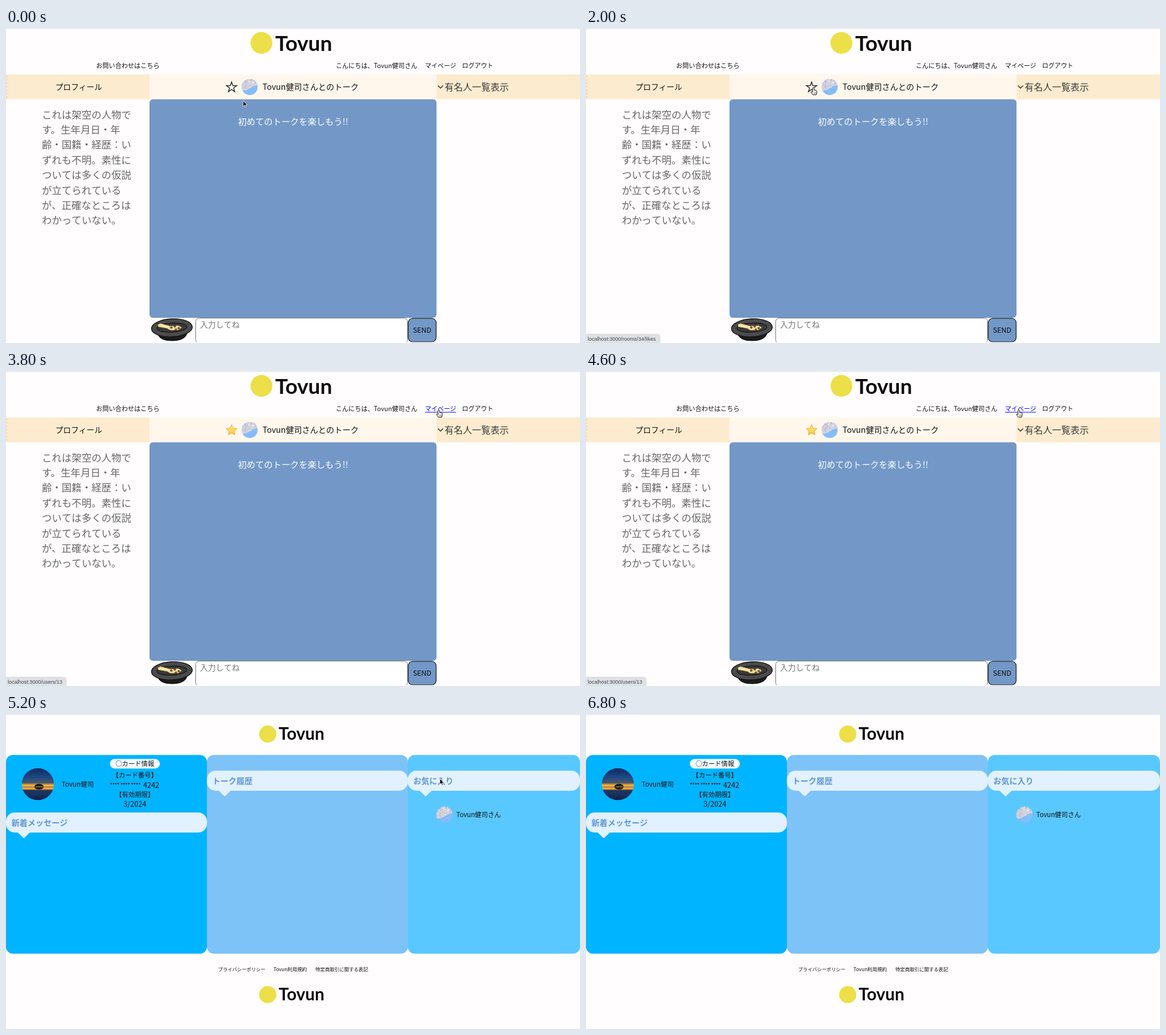
Animation of 1000 by 550 pixels, one loop 6.9 s. Source, as an HTML page with a canvas:

```html
<!DOCTYPE html>
<html lang="ja">
<head>
<meta charset="utf-8">
<title>Talk room</title>
<style>
html, body { margin: 0; width: 100%; height: 100%; overflow: hidden; background: #fffdfd; }
canvas { display: block; width: 1000px; height: 550px; }
</style>
</head>
<body>
<canvas id="stage" width="1000" height="550"></canvas>
<script>
const c = document.getElementById('stage').getContext('2d');
const LOOP = 6900, STEP = 100;
const JP = '"Noto Sans CJK JP", "Noto Sans CJK", sans-serif';
const BRAND = 'Tovun', USER = BRAND + '健司';

function text(s, x, cy, size, color = '#111', o = {}) {
  c.font = `${o.weight || 500} ${size}px ${o.font || JP}`;
  c.textAlign = o.align || 'left';
  c.textBaseline = 'alphabetic';
  c.fillStyle = color;
  c.fillText(s, x, cy + size * 0.38);
}

function rect(x, y, w, h, color) {
  c.fillStyle = color;
  c.fillRect(x, y, w, h);
}

function round(x, y, w, h, r, fill, stroke, line = 1) {
  c.beginPath();
  c.roundRect(x, y, w, h, r);
  paint(fill, stroke, line);
}

function poly(points, fill, stroke, line = 1) {
  c.beginPath();
  points.forEach(([x, y]) => c.lineTo(x, y));
  c.closePath();
  paint(fill, stroke, line);
}

function oval(x, y, rx, ry, fill, stroke, line = 1) {
  c.beginPath();
  c.ellipse(x, y, rx, ry, 0, 0, Math.PI * 2);
  paint(fill, stroke, line);
}

function paint(fill, stroke, line) {
  if (fill) { c.fillStyle = fill; c.fill(); }
  if (stroke) { c.strokeStyle = stroke; c.lineWidth = line; c.stroke(); }
}

function gradient(y0, y1, stops) {
  const g = c.createLinearGradient(0, y0, 0, y1);
  stops.forEach(([p, color]) => g.addColorStop(p, color));
  return g;
}

function inCircle(x, y, r, draw) {
  c.save();
  c.beginPath();
  c.arc(x, y, r, 0, Math.PI * 2);
  c.clip();
  c.translate(x, y);
  draw();
  c.restore();
}

function logo(cx, cy, r, x, base, size) {
  oval(cx, cy, r, r, '#ecdf48');
  text(BRAND, x, base - size * 0.38, size, '#0c0c0c', { weight: 700, font: 'Lato, sans-serif' });
}

// Blossoms against a blue sky
function blossom(x, y, r) {
  inCircle(x, y, r, () => {
    rect(-r, -r, 2 * r, 2 * r, '#84bdf8');
    poly([[-r, -r], [r, -r], [r, -4], [4, 0], [-4, 5], [-r, 7]], '#cfd2de');
    let seed = 7;
    const rnd = () => (seed = seed * 16807 % 2147483647) / 2147483647;
    for (let i = 0; i < 46; i++) {
      const px = (rnd() * 2 - 1) * r;
      const py = -r + rnd() * (r + 2 - px * 0.4);
      const s = 0.7 + rnd() * 0.8;
      oval(px, py, s, s, ['#f3e9ea', '#a9b3c8', '#dccdd0'][i % 3]);
    }
  });
}

// Sunset mirrored in water
function sunset(x, y, r) {
  inCircle(x, y, r, () => {
    rect(-r, -r, 2 * r, 2 * r, gradient(-r, r, [
      [0, '#0c2a60'], [0.3, '#204a86'], [0.46, '#4b5566'], [0.52, '#e3a63c'],
      [0.6, '#ffc04c'], [0.66, '#d08d38'], [0.69, '#22365c'], [0.85, '#16305f'], [1, '#0b1b40']]));
    rect(-r, 4.5, 2 * r, 1, '#6b4a22');
    oval(2, 4.5, 8, 5, '#1c1c20');
    rect(-4, 4, 13, 1.2, '#c8913a');
  });
}

function star(x, y, filled) {
  const pts = [];
  const [outer, inner] = filled ? [9.8, 4.6] : [9.4, 3.6];
  for (let i = 0; i < 10; i++) {
    const a = i * Math.PI / 5 - Math.PI / 2;
    const r = i % 2 ? inner : outer;
    pts.push([x + r * Math.cos(a), y + 0.6 + r * Math.sin(a)]);
  }
  c.lineJoin = filled ? 'round' : 'miter';
  if (filled) poly(pts, gradient(y - 10, y + 10, [[0, '#ffe98a'], [0.6, '#ffd850'], [1, '#f4ab35']]), '#eeb447', 1.1);
  else poly(pts, null, '#161616', 1.3);
}

function hat() {
  c.lineJoin = 'round';
  c.beginPath();
  c.moveTo(264, 532);
  c.quadraticCurveTo(266, 546, 289, 546);
  c.quadraticCurveTo(314, 546, 316, 530);
  c.closePath();
  paint('#1b1b1b', '#000', 1);
  c.save();
  c.translate(289, 523.5);
  c.rotate(-0.05);
  oval(0, 0, 35.6, 15.8, '#4b4b4b', '#111', 1.4);
  oval(0, -0.5, 26, 8, '#3a3a3a', '#111', 1.2);
  c.restore();
  poly([[264, 518], [269, 515.5], [286, 520], [300, 519], [307, 523], [300, 528], [286, 528], [281, 525], [265, 522]],
    '#f6e3a4', '#3a2a18', 0.8);
  [[288, 523], [294, 521], [301, 524], [296, 526.5]].forEach(([x, y]) => oval(x, y, 2, 1.5, '#8b6235', '#33210f', 0.6));
}

function frameTop() {
  rect(0, 0, 1000, 550, '#fffdfd');
  rect(0, 0, 1000, 1.5, '#dfe9ed');
}

function room(liked, hover) {
  frameTop();
  logo(445, 26, 19, 469, 40, 36.8);
  text('お問い合わせはこちら', 157, 66, 11.05);
  text('こんにちは、' + USER + 'さん', 574.5, 66, 11.05);
  text('マイページ', 730, 66, 10.9, hover ? '#0000ee' : '#111');
  if (hover) rect(730, 71.5, 54, 1, '#0000ee');
  text('ログアウト', 794.5, 66, 10.9);

  rect(0, 81, 1000, 43.5, '#fdebcf');
  rect(250, 81, 500, 43.5, '#fff7ec');
  for (let y = 83; y < 124; y += 6) rect(0, y, 2.5, 3, '#f3d9b2');
  text('プロフィール', 86, 103, 13.6);
  star(393, 103, liked);
  blossom(424.5, 103, 14);
  text(USER + 'さんとのトーク', 447, 103, 14.1);
  c.beginPath();
  c.moveTo(752.5, 100.5);
  c.lineTo(757, 105);
  c.lineTo(761.5, 100.5);
  paint(null, '#222', 1.4);
  text('有名人一覧表示', 764, 103, 16, '#3a3a3a');

  ['これは架空の人物で', 'す。生年月日・年', '齢・国籍・経歴：い', 'ずれも不明。素性に',
    'ついては多くの仮説', 'が立てられている', 'が、正確なところは', 'わかっていない。']
    .forEach((s, i) => text(s, 62.5, 151 + i * 26.4, 17.3, '#666'));

  round(250, 124.5, 500, 381.5, 6, '#7398c7');
  text('初めてのトークを楽しもう!!', 500, 163, 15.2, '#fff', { align: 'center' });

  hat();
  c.save();
  c.beginPath();
  c.rect(320, 500, 440, 48.5);
  c.clip();
  round(330.5, 506.5, 369, 44, 6, '#fff', '#777');
  text('入力してね', 338, 518, 13.8, '#757575');
  round(700.8, 506.8, 48.6, 41.4, 8, '#7398c7', '#20242a', 1.3);
  text('SEND', 725, 527.5, 12.4, '#0c0c0c', { align: 'center' });
  c.restore();
}

function bubble(x, y, w, label) {
  round(x, y, w, 35, 15, '#e2f1ff');
  poly([[x + 20, y + 34.5], [x + 42, y + 34.5], [x + 31, y + 45]], '#e2f1ff');
  text(label, x + 9.5, y + 17.7, 14, '#5f97d2', { weight: 700 });
}

function myPage() {
  frameTop();
  logo(456, 35, 15, 475, 45, 29.6);
  round(0, 71.5, 350, 347, 12, '#00b4ff');
  round(350, 71.5, 350, 347, 12, '#7dc3f8');
  round(700, 71.5, 300, 347, 12, '#59c8ff');

  sunset(55.5, 122.5, 28);
  text(USER, 97, 122.5, 11.5);
  round(181, 78.5, 87, 16.8, 8.4, '#f3faff');
  const mid = { align: 'center' };
  text('○カード情報', 224.5, 87, 11.2, '#111', mid);
  text('【カード番号】', 224.5, 107, 11.2, '#111', mid);
  text('**** **** ****', 181, 123.7, 8.2, '#111', { weight: 700 });
  text('4242', 239, 124, 12.6, '#111');
  text('【有効期限】', 224.5, 140.5, 11.2, '#111', mid);
  text('3/2024', 224.5, 157, 12.6, '#111', mid);

  bubble(0, 172, 350, '新着メッセージ');
  bubble(350, 99, 350, 'トーク履歴');
  bubble(700, 99, 300, 'お気に入り');
  blossom(764, 176, 14.3);
  text(USER + 'さん', 784.5, 175.8, 11.3);

  text('プライバシーポリシー', 369.5, 446, 8.25);
  text(BRAND + '利用規約', 466, 446, 8.5);
  text('特定商取引に関する表記', 539, 446, 8.35);
  logo(456, 490, 15, 475, 500, 29.6);
}

function status(url, w) {
  c.save();
  c.shadowColor = 'rgba(0,0,0,.35)';
  c.shadowBlur = 3;
  round(-2, 535.5, w + 2, 18, 4, '#dee2e6');
  c.restore();
  text(url, 3, 543, 9, '#444', { weight: 400, font: '"Liberation Sans", Arial, sans-serif' });
}

function arrow() {
  poly([[0, 0], [0, 10], [2.3, 8], [3.9, 11.6], [5.6, 10.8], [4, 7.4], [7.1, 7.2]], '#000', '#fff', 0.9);
}

function hand() {
  c.beginPath();
  c.moveTo(-1.4, 1);
  c.quadraticCurveTo(0, -1, 1.2, 1);
  c.lineTo(1.6, 4.6);
  c.quadraticCurveTo(4.5, 4, 6, 6);
  c.quadraticCurveTo(6.6, 9, 5, 12.6);
  c.lineTo(-0.8, 12.6);
  c.lineTo(-4.2, 8);
  c.quadraticCurveTo(-3.8, 6, -1.2, 8);
  c.closePath();
  paint('#fff', '#111', 1);
  c.beginPath();
  for (const x of [1, 2.6, 4.2]) {
    c.moveTo(x, 8.2);
    c.lineTo(x, 11);
  }
  paint(null, '#333', 0.6);
}

// Pointer path: time, x, y
const PATH = [
  [0, 413, 127], [300, 413, 127], [1100, 396, 104], [2500, 396, 104], [3000, 729, 66],
  [3100, 729, 66], [3400, 754, 68], [4900, 754, 68], [5700, 760, 210], [6400, 760, 210], [6750, 766, -14], [LOOP, 766, -14]
];

function pointerAt(t) {
  const i = PATH.findIndex(p => p[0] > t);
  const [t0, x0, y0] = PATH[i - 1], [t1, x1, y1] = PATH[i];
  const p = (t - t0) / (t1 - t0), e = p * p * (3 - 2 * p);
  return [x0 + (x1 - x0) * e, y0 + (y1 - y0) * e];
}

const during = (t, a, b) => t >= a && t < b;

function draw(t) {
  const onLink = during(t, 3200, 4700);
  if (t < 4700) room(t >= 2400, onLink);
  else myPage();
  if (during(t, 1000, 2500)) status('localhost:3000/rooms/34/likes', 128);
  if (during(t, 3300, 5100)) status('localhost:3000/users/13', 104);
  c.save();
  c.translate(...pointerAt(t));
  c.lineJoin = 'round';
  if (onLink || during(t, 900, 2600)) hand();
  else arrow();
  c.restore();
}

const start = performance.now();
function tick() {
  const t = (performance.now() - start) % LOOP;
  draw(Math.floor(t / STEP) * STEP);
  requestAnimationFrame(tick);
}
tick();
</script>
</body>
</html>
```
